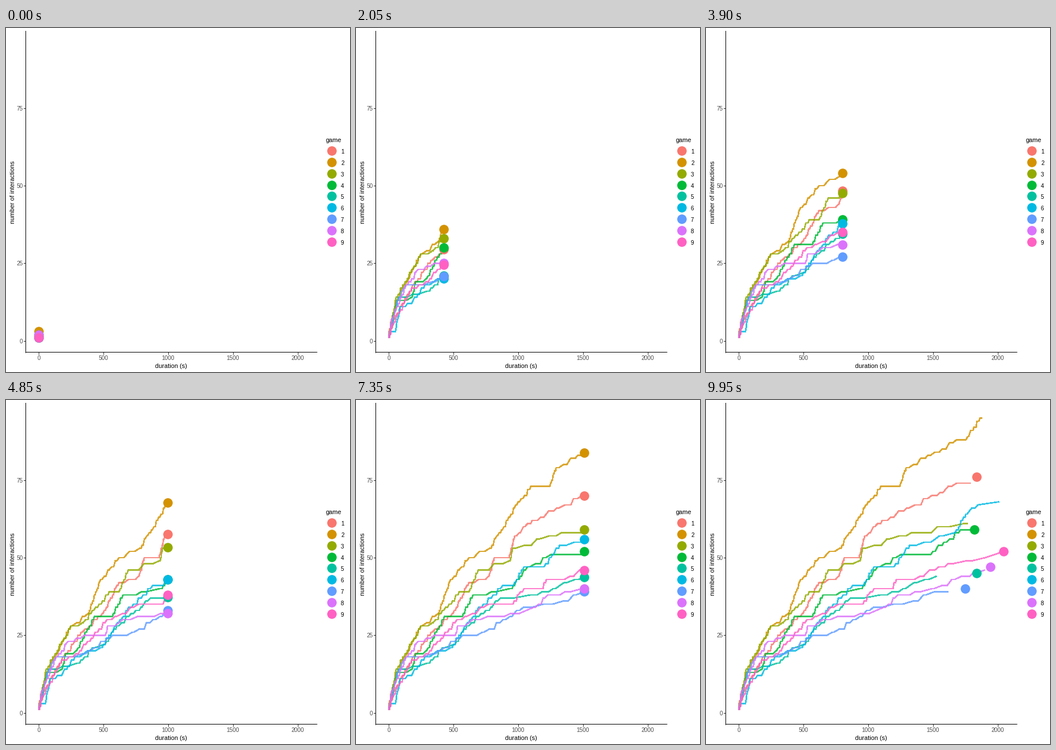
Write a matplotlib script that moves like this. It is 600x600 px and loops after 10000 ms.

```python
import numpy as np
import matplotlib.pyplot as plt
from matplotlib.animation import FuncAnimation

SIZE, DPI = 600, 100
FRAMES, INTERVAL = 200, 50
PX = 72 / DPI  # points per pixel
LEFT, START, END = 57, 57.4, 519

COLORS = ["#F8766D", "#D39200", "#93AA00", "#00BA38", "#00C19F",
          "#00B9E3", "#619CFF", "#DB72FB", "#FF61C3"]

plt.rcParams["font.family"] = "Liberation Sans"
rng = np.random.default_rng(4)
fig = plt.figure(figsize=(SIZE / DPI, SIZE / DPI), dpi=DPI, facecolor="white")
ax = fig.add_axes([0, 0, 1, 1])
ax.set_xlim(0, SIZE)
ax.set_ylim(SIZE, 0)
ax.axis("off")


def x_at(seconds):
    return LEFT + 0.226 * seconds


def y_at(count):
    return 545.5 - 5.411 * count


def rule(xs, ys, color="black"):
    ax.plot(xs, ys, color=color, lw=PX, antialiased=False,
            solid_capstyle="butt")


def label(x, y, text, size=10, color="black", **kw):
    ax.text(x, y, text, fontsize=size * PX, color=color, va="baseline", **kw)


def dot(x, y, color):
    return ax.plot([x], [y], "o", ms=16.5 * PX, mew=0, color=color,
                   antialiased=False, zorder=4)[0]


def draw_axes():
    for s in range(0, 2001, 500):
        x = round(x_at(s))
        rule([x, x], [565, 568.5], "#333333")
        label(x, 579, str(s), color="#4D4D4D", ha="center")
    for n in range(0, 76, 25):
        y = round(y_at(n))
        rule([30.5, 34], [y, y], "#333333")
        label(29.5, y + 4, str(n), color="#4D4D4D", ha="right")
    rule([34, 34], [5, 565.5])
    rule([33.5, 542], [565, 565])
    label(288, 593, "duration (s)", 11, ha="center")
    label(15.5, 286, "number of interactions", 11, ha="center",
          rotation=90, rotation_mode="anchor")


def draw_legend():
    label(558, 199, "game", 11)
    for i, color in enumerate(COLORS):
        y = 214 + 19.87 * i
        dot(568, y, color)
        label(584, round(y) + 5, str(i + 1))


def stairs(keys):
    """Climb between the keys in small steps with rests of random length."""
    points = [(LEFT, 1)]
    for x1, n1 in keys[:-1]:
        x0, n0 = points[-1]
        steps = max(1, round((n1 - n0) / 1.3))
        xs = np.linspace(x0, x1, steps + 1)
        ns = np.round(np.linspace(n0, n1, steps + 1))
        for i in range(steps):
            rest = rng.uniform(0.2, 0.75) * (xs[i + 1] - xs[i])
            points += [(xs[i] + rest, ns[i]), (xs[i + 1], ns[i + 1])]
    return points + [keys[-1]]


class Game:
    """One growing line with a marker at its head."""

    def __init__(self, color, *keys, hold=True):
        self.x, count = np.array(stairs(keys), float).T
        self.y = y_at(count)
        self.hold = hold
        self.line, = ax.plot([], [], color=color, lw=1.6 * PX, alpha=0.8,
                             antialiased=False, solid_capstyle="butt",
                             solid_joinstyle="round", zorder=3)
        self.head = dot(-50, -50, color)

    def reveal(self, x):
        if x <= self.x[-1]:
            y = np.interp(x, self.x, self.y)
            past = self.x < x
            self.line.set_data(np.append(self.x[past], x),
                               np.append(self.y[past], y))
            self.head.set_data([x], [y])
            self.head.set_visible(True)
        else:
            # a held marker stays at the end, its last segment is dropped
            n = len(self.x) - self.hold
            self.line.set_data(self.x[:n], self.y[:n])
            self.head.set_data(self.x[-1:], self.y[-1:])
            self.head.set_visible(self.hold)


draw_axes()
draw_legend()

# Keys are (x on the stage, number of interactions).
games = []
games.append(Game(
    COLORS[0], (68, 8), (103, 19), (131, 26), (168, 32), (197, 42), (231, 44),
    (241, 50), (266, 50), (277, 57), (307, 62), (437, 74), (462, 74),
    (472, 76)))
games.append(Game(
    COLORS[1], (START, 3), (70, 13), (113, 28), (143, 32), (165, 43),
    (197, 50), (233, 53), (283, 68), (305, 73), (337, 73), (349, 79),
    (437, 88), (451, 88), (478, 95), (482, 95), hold=False))
games.append(Game(
    COLORS[2], (70, 14), (113, 28), (133, 29), (180, 39), (196, 39),
    (213, 46), (268, 49), (273, 53), (358, 58), (450, 61), (457, 61),
    hold=False))
games.append(Game(
    COLORS[3], (START, 2), (72, 13), (97, 14), (104, 19), (122, 20),
    (154, 31), (183, 31), (204, 38), (268, 40), (299, 47), (340, 51),
    (386, 51), (444, 59), (461, 59), (468, 59)))
games.append(Game(
    COLORS[4], (74, 14), (124, 16), (151, 21), (171, 22), (193, 28),
    (252, 37), (305, 38), (402, 44), (472, 45)))
games.append(Game(
    COLORS[5], (60, 3), (68, 3), (77, 11), (102, 14), (120, 18), (165, 21),
    (214, 34), (256, 41), (272, 41), (293, 47), (325, 47), (355, 54),
    (433, 58), (453, 64), (474, 67), (511, 68), hold=False))
games.append(Game(
    COLORS[6], (72, 13), (87, 18), (133, 19), (187, 25), (221, 26), (292, 34),
    (361, 36), (398, 39), (423, 39), (452, 40)))
games.append(Game(
    COLORS[7], (START, 2), (62, 7), (87, 18), (108, 23), (137, 25), (173, 25),
    (177, 28), (229, 31), (310, 34), (335, 38), (394, 40), (446, 44),
    (486, 46), (496, 47)))
games.append(Game(
    COLORS[8], (63, 5), (97, 17), (122, 19), (176, 30), (231, 35), (270, 35),
    (293, 40), (324, 40), (332, 43), (357, 43), (422, 48), (487, 50),
    (519, 52)))

sweep = np.linspace(START, END, FRAMES)


def update(frame):
    for game in games:
        game.reveal(sweep[frame])
    return [a for game in games for a in (game.line, game.head)]


anim = FuncAnimation(fig, update, frames=FRAMES, interval=INTERVAL,
                     repeat=True, repeat_delay=0)
plt.show()
```
